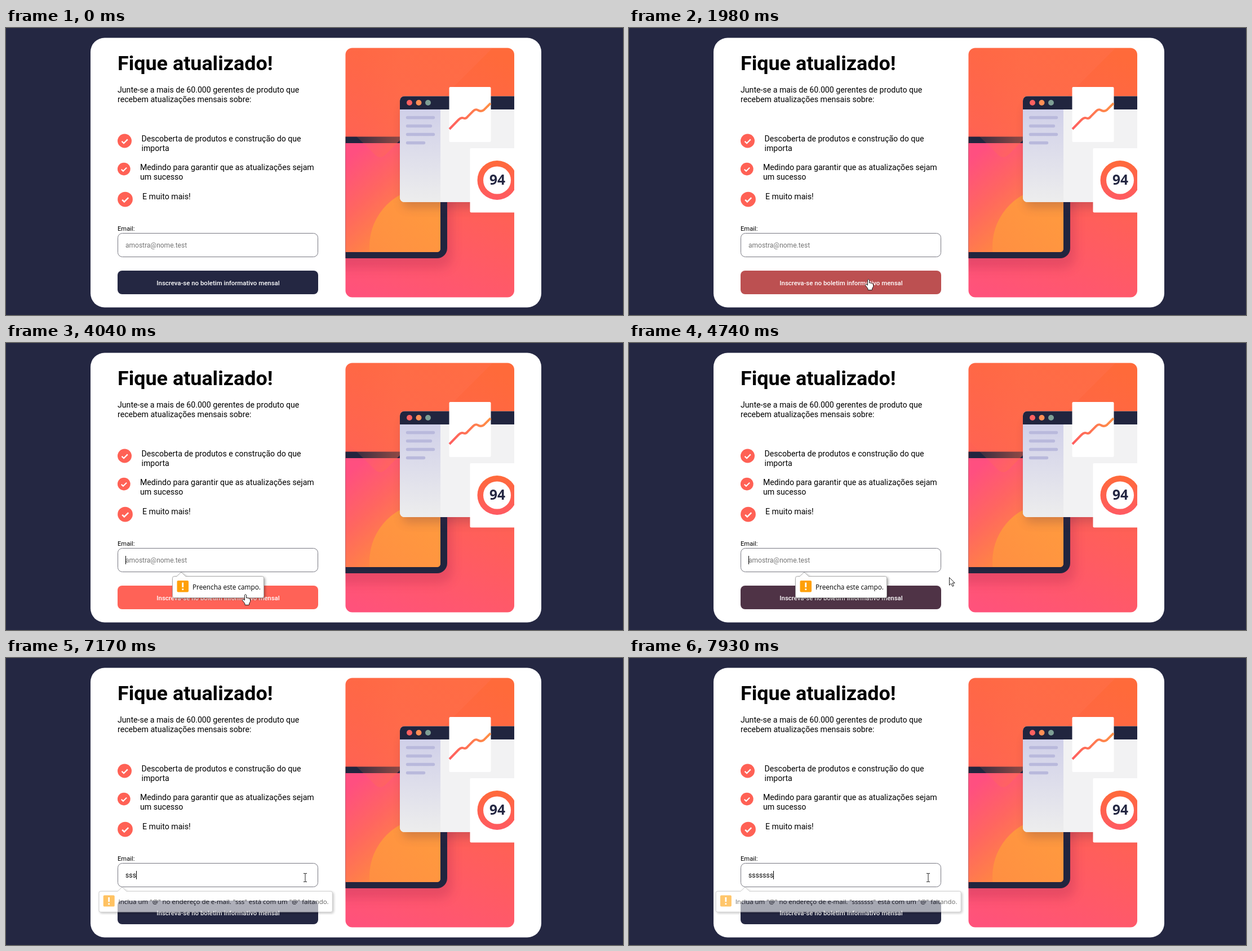
An HTML page that plays this animation: 1095 by 511 pixels, repeating every 8 s.

```html
<!DOCTYPE html>
<html lang="pt">
<head>
<meta charset="utf-8">
<style>
  html, body { margin: 0; width: 100%; height: 100%; overflow: hidden; background: #242742; }
  svg { display: block; font: 14.15px Roboto, sans-serif; }
  .bubble { font: 11.75px "Open Sans", sans-serif; }
</style>
</head>
<body>
<svg width="1095" height="511" viewBox="0 0 1095 511">
  <defs>
    <linearGradient id="backdrop" gradientUnits="userSpaceOnUse" x1="640" y1="480" x2="840" y2="36">
      <stop offset="0" stop-color="#ff527b"/><stop offset=".5" stop-color="#ff6154"/><stop offset="1" stop-color="#ff6a3a"/>
    </linearGradient>
    <linearGradient id="screen" gradientUnits="userSpaceOnUse" x1="615" y1="225" x2="715" y2="335">
      <stop offset="0" stop-color="#ff4f80"/><stop offset=".5" stop-color="#ff6660"/><stop offset="1" stop-color="#ff8544"/>
    </linearGradient>
    <linearGradient id="sun" x1="0" y1="1" x2="1" y2="0">
      <stop offset="0" stop-color="#ff8a44"/><stop offset="1" stop-color="#ffa03c"/>
    </linearGradient>
    <linearGradient id="side" x1="0" y1="0" x2="0" y2="1">
      <stop offset="0" stop-color="#d0d0e9"/><stop offset="1" stop-color="#ededed"/>
    </linearGradient>
    <linearGradient id="warm" x1="0" y1="1" x2="0" y2="0">
      <stop offset="0" stop-color="#ff5a62"/><stop offset="1" stop-color="#ff6a3a"/>
    </linearGradient>
    <linearGradient id="trend">
      <stop offset="0" stop-color="#ff5f60"/><stop offset="1" stop-color="#ff8f45"/>
    </linearGradient>
    <linearGradient id="veil" gradientUnits="userSpaceOnUse" x1="630" y1="0" x2="699" y2="0">
      <stop offset="0" stop-color="#ff6f4c" stop-opacity=".15"/><stop offset="1" stop-color="#ff6f4c" stop-opacity=".5"/>
    </linearGradient>
    <clipPath id="picture"><rect x="602.5" y="35.5" width="299.5" height="444" rx="12"/></clipPath>
    <clipPath id="display"><path d="M602 205H771V393a6 6 0 0 1-6 6H602z"/></clipPath>
    <filter id="soft" x="-30%" y="-30%" width="160%" height="160%"><feGaussianBlur stdDeviation="9"/></filter>
    <filter id="drop"><feDropShadow dx="2" dy="2" stdDeviation="2" flood-opacity=".35"/></filter>
    <g id="tick"><circle r="12.5" fill="#ff6155"/><path d="M-5 .8l3.5 3.4L5.3-2.6" fill="none" stroke="#fff" stroke-width="2.3"/></g>
  </defs>

  <rect x="150" y="17.5" width="800" height="480" rx="25" fill="#fff"/>
  <text x="198" y="75" font-size="35.9" font-weight="700">Fique atualizado!</text>
  <text x="198" y="115">Junte-se a mais de 60.000 gerentes de produto que</text>
  <text x="198" y="132">recebem atualizações mensais sobre:</text>
  <use href="#tick" transform="translate(210.5 201)"/>
  <text x="240.5" y="202">Descoberta de produtos e construção do que</text>
  <text x="240.5" y="219">importa</text>
  <use href="#tick" transform="translate(209.3 251) scale(.91)"/>
  <text x="238" y="253">Medindo para garantir que as atualizações sejam</text>
  <text x="238" y="270">um sucesso</text>
  <use href="#tick" transform="translate(211.5 305) scale(1.07)"/>
  <text x="242" y="305">E muito mais!</text>
  <text x="198" y="361" font-size="11.2">Email:</text>
  <rect x="198.5" y="365.5" width="355" height="42" rx="8" fill="#fff" stroke="#777781"/>
  <text id="field" x="212" y="391" font-size="12"></text>
  <path id="caret" d="M212.5 379v15" stroke="#000"/>
  <rect id="button" x="198" y="432" width="356" height="42" rx="8"/>
  <text x="376.5" y="457.5" font-size="11.45" font-weight="500" fill="#fff" text-anchor="middle">Inscreva-se no boletim informativo mensal</text>

  <g clip-path="url(#picture)">
    <rect x="602" y="35" width="301" height="445" fill="url(#backdrop)"/>
    <rect x="570" y="220" width="222" height="208" rx="22" fill="#a02050" opacity=".25" filter="url(#soft)"/>
    <rect x="560" y="193.5" width="223" height="216.5" rx="18" fill="#21253f"/>
    <g clip-path="url(#display)">
      <rect x="602" y="205" width="170" height="195" fill="url(#screen)"/>
      <circle cx="750" cy="389" r="105" fill="url(#sun)"/>
    </g>
    <path d="M602 173L654 225q10 10 20 0L863 36H602z" fill="url(#veil)"/>
    <rect x="704" y="140" width="240" height="180" rx="8" fill="#40204a" opacity=".22" filter="url(#soft)"/>
    <rect x="699" y="121.5" width="240" height="188.5" rx="8" fill="#f2f2f3"/>
    <path d="M699 145H771V310H707a8 8 0 0 1-8-8z" fill="url(#side)"/>
    <path d="M699 145V129.5a8 8 0 0 1 8-8H910V145z" fill="#21253f"/>
    <circle cx="716" cy="133" r="5" fill="#ff6160"/><circle cx="732.5" cy="133" r="5" fill="#ff8f55"/><circle cx="749" cy="133" r="5" fill="#7e9f95"/>
    <path d="M712.5 159.5h46M712.5 174.5h41M712.5 189.5h46M712.5 204.5h29" stroke="#b9b9dc" stroke-width="5.5" stroke-linecap="round"/>
    <rect x="786.5" y="105" width="74" height="98" rx="2" fill="#fff"/>
    <path d="M787 180L803 163.5Q808 158.5 812 160.5T820 157L829 148Q833.5 143.5 838 146.5T848 146L860 134" fill="none" stroke="url(#trend)" stroke-width="4"/>
    <rect x="823.5" y="214" width="90" height="114.5" rx="2" fill="#fff"/>
    <circle cx="871.5" cy="271" r="35" fill="url(#warm)"/><circle cx="871.5" cy="271" r="24.5" fill="#fff"/>
    <text x="872" y="279" text-anchor="middle" fill="#242742" style="font:700 24.5px 'Open Sans',sans-serif">94</text>
  </g>

  <g id="bubble" class="bubble">
    <path id="outline" fill="#fff" stroke="#a9a9a9" filter="url(#drop)"/>
    <g id="content">
      <rect x="8" y="423" width="20.5" height="20.5" rx="2" fill="#ffa008"/>
      <path d="M18.2 426.5v8.5M18.2 437.2v2.8" stroke="#fff" stroke-width="2.8"/>
      <text id="message" x="35.5" y="439"></text>
    </g>
  </g>

  <g id="cursor" stroke="#222" fill="#fff">
    <path id="arrow" d="M.5.5V14.2L3.7 11.2 6 16.3 8.3 15.3 6 10.3H10.2z"/>
    <path id="beam" d="M-3-7.5h2.2L0-7 .8-7.5H3M0-7V7M-3 7.5h2.2L0 7l.8.5H3" fill="none"/>
    <path id="hand" d="M-1.5 11V1.7Q0-.8 1.5 1.7V7Q3.2 5.6 4.2 7.4 5.8 6.6 6.6 8.3 8.5 7.7 8.5 10V13.5L6.5 17V19.5H-1V17L-5.5 11.2Q-5.2 8.6-3 9.7z"/>
  </g>
</svg>
<script>
const $ = id => document.getElementById(id);
const LOOP = 8000, CLICK = 2500, REFOCUS = 5690;
const keys = [6605, 6805, 7000, 7195, 7385, 7580, 7770];
const path = [ // time, x, y
  [190, 736, 481], [500, 520, 412], [960, 405, 374], [1100, 414, 334], [1300, 414, 334],
  [1690, 426, 433], [1710, 426, 437], [1850, 425, 447], [4040, 425, 447], [4390, 500, 431],
  [4700, 568, 417], [4870, 568, 417], [5130, 561, 395], [5280, 561, 395], [5420, 536, 391],
  [5690, 536, 391], [5760, 531, 390.5], [LOOP, 531, 390.5]
];

// CSS "ease" curve
function ease(x) {
  if (x <= 0) return 0;
  if (x >= 1) return 1;
  const curve = (p, a, b) => 3 * a * p * (1 - p) ** 2 + 3 * b * p * p * (1 - p) + p ** 3;
  let lo = 0, hi = 1;
  for (let i = 0; i < 16; i++) {
    const mid = (lo + hi) / 2;
    if (curve(mid, .25, .25) < x) lo = mid; else hi = mid;
  }
  return curve(lo, .1, 1);
}

const show = (id, on) => $(id).style.display = on ? '' : 'none';

function drawCursor(t) {
  show('cursor', t >= path[0][0]);
  if (t < path[0][0]) return;
  const i = path.findIndex(p => p[0] > t);
  const [t0, x0, y0] = path[i - 1], [t1, x1, y1] = path[i];
  const f = (t - t0) / (t1 - t0), x = x0 + (x1 - x0) * f, y = y0 + (y1 - y0) * f;
  const inside = (top, bottom) => x > 198 && x < 554 && y > top && y < bottom;
  const beam = inside(366, 408), hand = inside(432, 475);
  show('beam', beam);
  show('hand', hand);
  show('arrow', !beam && !hand);
  $('cursor').setAttribute('transform', `translate(${Math.round(x)} ${Math.round(y)})`);
}

function drawField(t, typed) {
  $('field').textContent = typed ? 's'.repeat(typed) : 'amostra@nome.test';
  $('field').setAttribute('fill', typed ? '#000' : '#757575');
  $('field').setAttribute('letter-spacing', typed ? .12 : 0);
  const blink = t < REFOCUS ? t >= 2590 && t < 5580 && (t - 2590) % 1000 < 500 : (t - REFOCUS) % 1000 < 500;
  show('caret', typed || blink);
  $('caret').setAttribute('transform', `translate(${Math.round(typed * 6.3)} 0)`);
}

function drawButton(t) {
  const hot = ease((t - 1695) / 700) - ease((t - 4390) / 700);
  const mix = (a, b) => Math.round(a + (b - a) * hot);
  $('button').setAttribute('fill', `rgb(${mix(36, 255)},${mix(39, 98)},${mix(66, 87)})`);
}

function drawBubble(t, typed) {
  show('bubble', t >= CLICK);
  if (t < CLICK) return;
  const start = typed ? keys[typed - 1] : CLICK;
  const tip = typed ? 206 : 311, width = typed ? 408.5 + 5.6 * typed : 162;
  const left = 376.5 - width / 2, right = left + width, e = ease((t - start) / 466), scale = .93 + .07 * e;
  $('message').textContent = typed
    ? `Inclua um "@" no endereço de e-mail. "${'s'.repeat(typed)}" está com um "@" faltando.`
    : 'Preencha este campo.';
  $('outline').setAttribute('d', `M${left + 3} 415.5H${tip - 8}L${tip} 408L${tip + 8} 415.5H${right - 3}
    q3 0 3 3V450.5q0 3-3 3H${left + 3}q-3 0-3-3V418.5q0-3 3-3z`);
  $('content').setAttribute('transform', `translate(${left} 0)`);
  $('bubble').setAttribute('transform', `translate(${tip} 408) scale(${scale}) translate(${-tip} -408)`);
  $('bubble').setAttribute('opacity', e);
}

function frame() {
  const t = performance.now() % LOOP, typed = keys.filter(k => t >= k).length;
  drawField(t, typed);
  drawButton(t);
  drawBubble(t, typed);
  drawCursor(t);
  requestAnimationFrame(frame);
}
frame();
</script>
</body>
</html>
```
